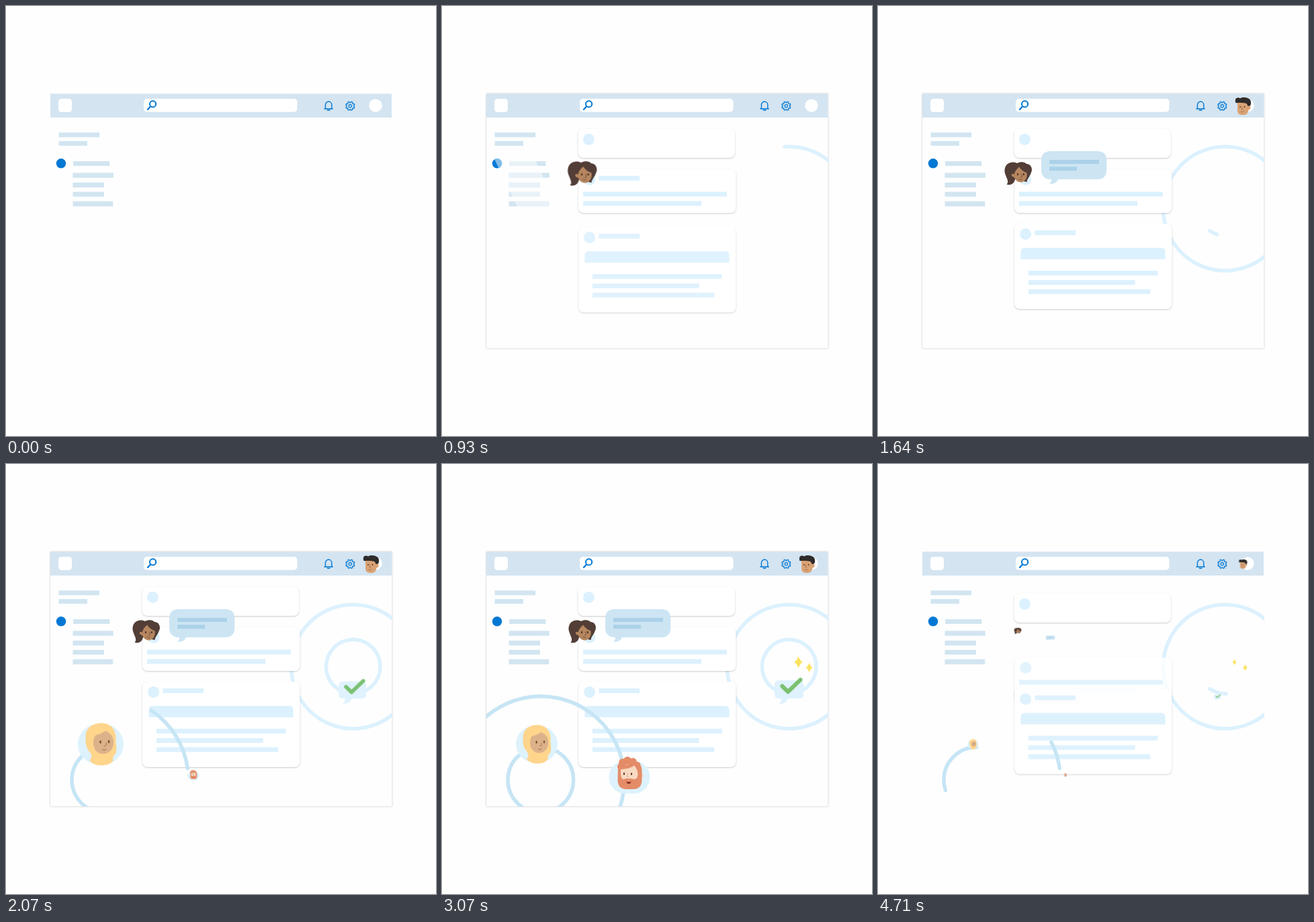
These frames come from a looping animation (640x640 px, 4780 ms). An HTML page:

```html
<!DOCTYPE html>
<html lang="en">
<head>
<meta charset="utf-8">
<title>Community feed</title>
<style>
  html, body { margin: 0; width: 100%; height: 100%; overflow: hidden; background: #fefefe; }
  svg { display: block; width: 100%; height: 100%; }

  .bar { fill: #d2e5f1; }
  .pale { fill: #dcf1fe; }
  .icon { fill: none; stroke: #0078d4; stroke-width: 1.4; stroke-linecap: round; stroke-linejoin: round; }
  .line { fill: none; stroke-width: .9; stroke-linecap: round; }
  .shadow { filter: drop-shadow(0 .5px 1px rgba(0, 0, 0, .28)); }
  .sheet { fill: #fff; filter: drop-shadow(0 1px 1.2px rgba(0, 0, 0, .2)); }
  .ring { fill: none; stroke-width: 5.5; stroke-linecap: round; stroke-dasharray: 1 2; }

  /* Every animation is paused; the script sets its time in steps of one frame. */
  .shadow, .card, .pop, .ring, .shine, .title { animation-play-state: paused !important; }
  .shadow { animation: show 1ms 139ms both, hide 1ms 4630ms forwards; }
  .title { animation: hide 95ms 1105ms both linear; }
  .shine { animation: sweep 500ms 685ms both linear; }
  .card {
    animation: rise var(--len) var(--at) both ease-in-out,
               drop 214ms 4495ms forwards ease-in;
  }
  .pop {
    animation: pop 280ms var(--at) both linear,
               shrink var(--out) 4495ms forwards linear;
  }
  .ring {
    animation: draw var(--len) var(--at) both linear,
               erase var(--out) var(--end, 4495ms) forwards linear;
  }

  @keyframes show { from { opacity: 0; } }
  @keyframes hide { to { opacity: 0; } }
  @keyframes sweep { from { transform: translateX(40px); } to { transform: translateX(-160px); } }
  @keyframes rise { from { transform: translateY(50px); opacity: 0; } }
  @keyframes drop { to { transform: translateY(var(--drop)); opacity: var(--fade); } }
  @keyframes pop { from { transform: scale(0); } 60% { transform: scale(1.1); } to { transform: scale(1); } }
  @keyframes shrink { to { transform: scale(0); } }
  @keyframes draw { from { stroke-dashoffset: 1.05; } to { stroke-dashoffset: 0; } }
  @keyframes erase { to { stroke-dashoffset: 1.05; } }
</style>
</head>
<body>
<svg viewBox="0 0 640 640">
  <defs>
    <clipPath id="window"><rect x="66" y="130" width="508.5" height="379.5"/></clipPath>
    <clipPath id="nav"><path d="M100 231h54.3v7H100zM99.5 248.3h60.3v7.4H99.5zM99.5 262.8H146v7.4H99.5zM99.5 276.7H146v7H99.5zM99.5 290.7h59.8v7.5H99.5zM74.8 234.3a7.2 7.2 0 0 0 14.4 0a7.2 7.2 0 0 0-14.4 0z"/></clipPath>
    <path id="star" d="M0-9Q1.7-2.6 6.3 0Q1.7 2.6 0 9Q-1.7 2.6-6.3 0Q-1.7-2.6 0-9z" fill="#fbe25e"/>
  </defs>

  <!-- window and header -->
  <rect class="shadow" x="66" y="130.5" width="508.5" height="379" fill="#fefefe"/>
  <rect x="66" y="130.5" width="508" height="35.5" fill="#d4e4f1"/>
  <rect x="78" y="138" width="20" height="20" rx="4.5" fill="#fff"/>
  <rect x="205" y="138" width="228.5" height="19.7" rx="5" fill="#fff"/>
  <g class="icon">
    <circle cx="218.6" cy="145.9" r="4.6" stroke-width="2"/>
    <path d="M215 149.6L211 154" stroke-width="2.3"/>
    <path d="M475.4 152.8V147a4.7 4.7 0 0 1 9.4 0v5.8M473.9 153h12.4M478.3 154.8q1.8 1 3.6 0"/>
    <path id="gear" stroke-width="1.2"/>
    <circle cx="512.3" cy="148.8" r="2.1" stroke-width="1.2"/>
  </g>
  <circle cx="550" cy="148.2" r="9.7" fill="#fff"/>

  <!-- side navigation -->
  <g class="bar">
    <rect x="78.5" y="188.3" width="60.6" height="7"/>
    <rect x="78.5" y="201" width="42.4" height="7"/>
    <rect x="100" y="231" width="54.3" height="7"/>
    <rect x="99.5" y="248.3" width="60.3" height="7.4"/>
    <rect x="99.5" y="262.8" width="46.5" height="7.4"/>
    <rect x="99.5" y="276.7" width="46.5" height="7"/>
    <rect x="99.5" y="290.7" width="59.8" height="7.5"/>
  </g>
  <circle cx="82" cy="234.3" r="7.2" fill="#0078d4"/>
  <g clip-path="url(#nav)">
    <path class="shine" d="M134 226h60l36 75h-60z" fill="#fff" fill-opacity=".5"/>
  </g>

  <!-- rings on the right -->
  <g clip-path="url(#window)" stroke="#dcf1fe">
    <circle class="ring" r="92.3" pathLength="1" transform="translate(516.7 301.6) scale(1 -1)"
      style="--at:785ms;--len:480ms;--out:2000ms"/>
    <circle class="ring" r="40.3" pathLength="1" transform="translate(516.7 301.6) rotate(125) scale(1 -1)"
      style="--at:1600ms;--len:430ms;--out:250ms"/>
  </g>

  <!-- cards -->
  <g class="card" style="--at:430ms;--len:320ms;--drop:10px;--fade:1">
    <rect class="sheet" x="202.5" y="183" width="233.5" height="43" rx="8"/>
    <circle class="pale" cx="218.4" cy="198.5" r="8.5"/>
  </g>
  <g class="card" style="--at:540ms;--len:320ms;--drop:45px;--fade:.8">
    <rect class="sheet" x="203" y="243" width="234.5" height="65" rx="8"/>
    <g class="pale">
      <circle cx="219.7" cy="258.3" r="8.5"/>
      <rect class="title" x="233.5" y="252.7" width="60.5" height="7"/>
      <rect x="210" y="276.5" width="214" height="7"/>
      <rect x="210" y="290.4" width="176" height="7"/>
    </g>
  </g>
  <g class="card" style="--at:640ms;--len:370ms;--drop:10.5px;--fade:.92">
    <rect class="sheet" x="203" y="324" width="234.5" height="127" rx="8"/>
    <g class="pale">
      <circle cx="219.6" cy="339.6" r="8.5"/>
      <rect x="233.5" y="334" width="60.5" height="7"/>
      <path d="M212.5 377v-11q0-6 6-6h203q6 0 6 6v11z"/>
      <rect x="224" y="394" width="192.5" height="7"/>
      <rect x="224" y="408" width="158.6" height="7"/>
      <rect x="224" y="421.6" width="181.2" height="7"/>
    </g>
  </g>

  <!-- rings on the left -->
  <g clip-path="url(#window)" stroke="#c6e5f5">
    <circle class="ring" r="124.5" pathLength="1" transform="translate(147 470.3) rotate(-8) scale(1 -1)"
      style="--at:1900ms;--len:966ms;--out:259ms;--end:4475ms"/>
    <circle class="ring" r="48.8" pathLength="1" transform="translate(146.8 470.3) rotate(-90) scale(1 -1)"
      style="--at:1790ms;--len:640ms;--out:321ms"/>
  </g>

  <!-- woman with brown hair -->
  <g class="pop" style="--at:725ms;--out:292ms;transform-origin:207.8px 248px">
    <path fill="#523e37" d="M191.5 265.5C197 260 187 252 188.6 243C190 233 200 230.500 207 234C212 231 219 232 221 235C228 235 231 243 227.500 249C226 254 222 257 221.500 262L204 258C203 264 198 267.500 191.500 265.500z"/>
    <path fill="#b5865f" d="M210 239.500C205 244 203.500 247 202.800 250.500C198 247.500 197 254 202.800 255C205 261 211 264 216 261.500C221 259 222.500 253 221.300 248C217 247 213 244 210 239.500z"/>
    <g fill="#4a332a"><ellipse cx="208" cy="250.500" rx="1.100" ry="1.700"/><ellipse cx="216.800" cy="250.500" rx="1.100" ry="1.700"/></g>
    <path class="line" stroke="#75503a" d="M213.500 250l.8 4.500-1.800.6M209.500 257.500q2.500 1.800 4.500.6"/>
  </g>

  <!-- speech bubble -->
  <g class="pop" style="--at:1028ms;--out:249ms;transform-origin:250.700px 262px">
    <path fill="#cde5f3" d="M257 216h69q14.300 0 14.300 14.300v13.400q0 14.300-14.300 14.300h-58C267 262 262 265.500 255 264.500C257.500 263 258 261 258 258q-15 0-15-14.300v-13.400q0-14.300 14-14.300z"/>
    <path fill="#abd2e9" d="M255 229h74v6h-74zM255 239.300h41v6h-41z"/>
  </g>

  <!-- man in the header -->
  <g class="pop" style="--at:1132ms;--out:455ms;transform-origin:543.200px 148.800px">
    <path fill="#d9a375" d="M535 144C540 143 546 144 548 141C550 146 551 149 553 148.500C556 150 554.500 155 551.500 154.500C551 159 549 162 544 162.200C538 162.500 535 160 535 156z"/>
    <path fill="#2f2b2a" d="M532 141C531 136 537 135.500 539 137.500C543 135 549 136 552 138C556 140 555.500 146 554 148.500L550.500 149C549 142.500 544 145 536 144C532 145 531.500 143 532 141z"/>
    <g fill="#4a2f22"><circle cx="539" cy="150" r=".9"/><circle cx="545.500" cy="150" r=".9"/></g>
    <path class="line" stroke="#a56f47" d="M542 150.500l-.8 3.500h1.300M540 157.500q2.500 1.300 4.500-.5"/>
  </g>

  <!-- blonde woman -->
  <g class="pop" style="--at:1901ms;--out:289ms;transform-origin:141.500px 417px">
    <rect x="110" y="390" width="62" height="54" rx="27" fill="#ddf2fd"/>
    <path fill="#ffd58c" d="M141 388.500C153 388 162 396 161.500 410C161 418 164 423 161 430C157 434 157 436 158 439C154 445 147 446 141 445.700C134 446 129 443 126 439C131 433 128 430 124 425C120 418 120.500 412 120.500 406C121 396 129 388.500 141 388.500z"/>
    <path fill="#dcb28a" d="M147 399C156 402 160 410 158 418C156 429 146 432 139 429C130 425 129 412 134 405C140 403 144 402 147 399z"/>
    <g fill="#7a5233"><ellipse cx="140.600" cy="414" rx="1.200" ry="2.200"/><ellipse cx="152" cy="413.600" rx="1.200" ry="2.200"/></g>
    <path class="line" stroke="#9a6c45" d="M148.500 415.500c.5 3-1 4.500-2.800 4.300M143 424.300q3 2 5.200-.3"/>
  </g>

  <!-- man with a beard -->
  <g class="pop" style="--at:2026ms;--out:237ms;transform-origin:279px 463px">
    <rect x="248.500" y="442" width="61" height="48.500" rx="24" fill="#ddf2fd"/>
    <circle cx="297.500" cy="464" r="2.600" fill="#f8d9c2"/>
    <g fill="#e48c68">
      <path d="M262 452L290 443Q297.500 447 297.500 456V470Q297.500 484 284 484H275Q261.500 484 261.500 470z"/>
      <circle cx="269" cy="444.500" r="6"/><circle cx="276" cy="441.500" r="6"/>
      <circle cx="284" cy="443.500" r="6"/><circle cx="290" cy="448.500" r="5.500"/>
      <circle cx="265.500" cy="450.500" r="4.500"/>
    </g>
    <path fill="#f8d9c2" d="M266 454.500C274 454 283 452 286 448.500C289 452 291.500 456 291.500 463C290.500 470 286 469.500 283 468.500H273C269 470 265.500 470 266 454.500z"/>
    <path fill="#e48c68" d="M271 471Q273 466.500 278 468.500Q283 466.500 285 471z"/>
    <path fill="#852d24" d="M274.500 472.500Q278 474 281.500 472.500Q281 476 278 476T274.500 472.500z"/>
    <g fill="#61382a"><ellipse cx="271" cy="461" rx="1.100" ry="1.900"/><ellipse cx="282" cy="461.300" rx="1.100" ry="1.900"/></g>
    <path class="line" stroke="#e0a98c" d="M276.500 460.500l-1.200 4.800h2.200"/>
  </g>

  <!-- approved reply -->
  <g class="pop" style="--at:1925ms;--out:278ms;transform-origin:502px 350px">
    <path fill="#dff2fe" d="M501 322h31q6 0 6 6v15q0 6-6 6h-17C513 355 508 357.500 501 357C504 355 505 353 505 349h-4q-6 0-6-6v-15q0-6 6-6z"/>
    <path d="M506.300 330.500L515 339L533.500 321.200" fill="none" stroke="#7bc172" stroke-width="6" stroke-linecap="round" stroke-linejoin="round"/>
  </g>
  <g class="pop" style="--at:2660ms;--out:430ms;transform-origin:530.500px 295px">
    <use href="#star" x="530.500" y="295"/>
  </g>
  <g class="pop" style="--at:2780ms;--out:670ms;transform-origin:546.500px 303px">
    <use href="#star" transform="translate(546.500 303) scale(.8)"/>
  </g>
</svg>
<script>
  const LOOP = 4780, FRAME = LOOP / 67;

  // Gear outline: eight teeth, four corners each
  const corners = [[-.36, 5], [-.2, 6.7], [.2, 6.7], [.36, 5]];
  const points = [];
  for (let tooth = 0; tooth < 8; tooth++) {
    for (const [shift, radius] of corners) {
      const angle = (tooth + .5 + shift) * Math.PI / 4;
      points.push(`${512.3 + radius * Math.cos(angle)} ${148.8 + radius * Math.sin(angle)}`);
    }
  }
  document.getElementById('gear').setAttribute('d', `M${points.join('L')}z`);

  const animations = document.getAnimations();

  function render(now) {
    const time = Math.floor((now % LOOP + 5) / FRAME) % 67 * FRAME;
    for (const animation of animations) animation.currentTime = time;
    requestAnimationFrame(render);
  }
  requestAnimationFrame(render);
</script>
</body>
</html>
```
